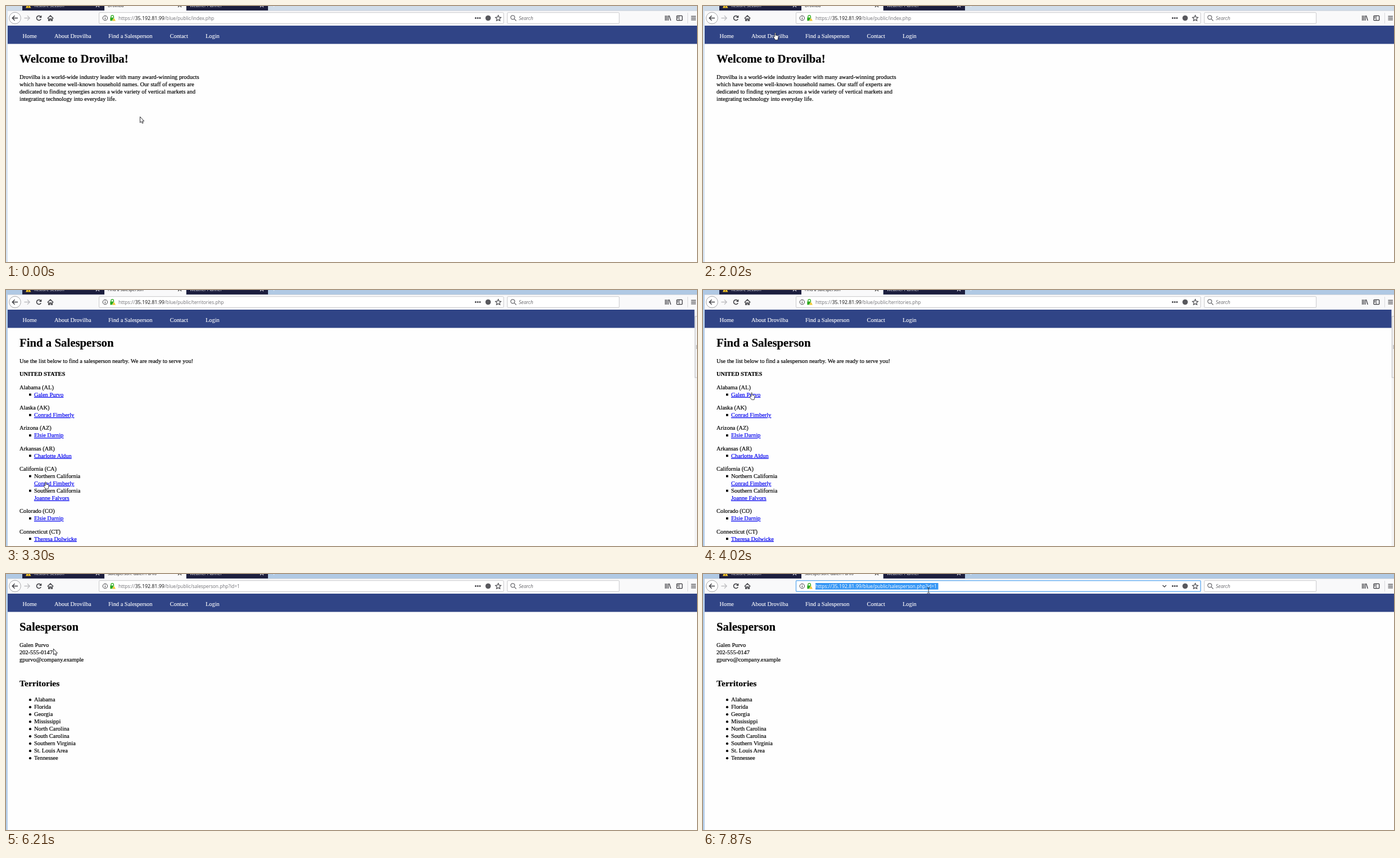
Animation, 1229 px wide and 456 px high, one loop 8 s. Source, as an HTML page:

```html
<!DOCTYPE html>
<html lang="en">
<head>
<meta charset="utf-8">
<title>Browsing session</title>
<style>
  html, body { margin: 0; width: 100%; height: 100%; overflow: hidden; background: #fefefe; }
  svg { display: block; width: 100%; height: 100%; }
  text { font: 10.4px "Liberation Serif", "Times New Roman", serif; white-space: pre; }
  #home text, #list text, #person text { stroke: #000; stroke-width: .2; }
  .h1 { font-size: 20.8px; font-weight: bold; }
  .h2 { font-size: 15.6px; font-weight: bold; }
  .bold { font-weight: bold; }
  .nav { fill: #fff; stroke: #fff; stroke-width: .12; }
  #list .link { fill: #00e; stroke: #00e; text-decoration: underline; }
  .ui { font-family: "Open Sans", "Noto Sans", sans-serif; }
  .tab { font-size: 7.3px; }
  .icon { fill: none; stroke: #3c3c41; stroke-width: 1.3; }
  .field { fill: #fff; stroke: #c8c8ca; }
  #frame { fill: #d6e3f1; }
  #strip { fill: #cfdce9; }
  .active #frame { fill: #b7cfea; }
  .active #strip { fill: #b0c9e4; }
  .hover #urlBox { stroke: #aaaaae; }
  .focus #urlBox { stroke: #6fb3f2; stroke-width: 1.5; }
  #selection, #chevron { visibility: hidden; }
  .focus #selection, .hover #chevron { visibility: visible; }
  .url { fill: #707075; }
  .focus .url { fill: #fff; }
  #host { fill: #0c0c0d; }
  .focus #host { fill: #fff; }
</style>
</head>
<body>
<svg id="stage" viewBox="0 0 1229 456">
  <rect width="1229" height="456" fill="#fefefe"/>
  <rect id="strip" width="1229" height="8"/>
  <rect x="3" y="8" width="1226" height="28" fill="#f9f9fa"/>
  <rect id="frame" y="8" width="3" height="448"/>

  <g id="tabs">
    <path d="M29 0H175V8H29ZM320.500 0H466V8H320.500Z" fill="#1c1e3e"/>
    <path d="M3 8.300H175M320 8.300H1229" stroke="#b4bac4" stroke-width=".6"/>
    <rect x="175" width="145.500" height="9" fill="#f9f9fa"/>
    <rect id="burst" x="175" height="8" fill="#b9dcfb"/>
    <path d="M38.500 -4H40.500L44.500 3.500H35Z" fill="#f5c629"/>
    <path d="M39.700 0V2.500" stroke="#503c00"/>
    <text class="ui tab" x="50" y="2" fill="#f4f4f6">Restore Session</text>
    <text class="ui tab" id="tabTitle" x="181" y="2" fill="#1a1a1c"></text>
    <text class="ui tab" x="327" y="2" fill="#f4f4f6">Weather Planner</text>
    <path d="M160 -4L166 2M166 -4L160 2M452 -4L458 2M458 -4L452 2" stroke="#e8e8ee" stroke-width="1.2"/>
    <path d="M306 -4L312 2M312 -4L306 2" stroke="#333" stroke-width="1.2"/>
    <path d="M476.500 0V1.500" stroke="#f4f7fb"/>
  </g>

  <g class="icon">
    <circle cx="16" cy="21.500" r="10.300" fill="#fff" stroke="#a5a5a8" stroke-width="1"/>
    <path d="M21 21.500H11.500M15.500 17.300L11.300 21.500L15.500 25.700" stroke-width="1.500"/>
    <path d="M32.500 21.500H42M38 17.300L42.200 21.500L38 25.700" stroke="#bdbdc0"/>
    <path d="M61.300 18.600A4 4 0 1 0 62.200 23" stroke-width="1.500"/>
    <path d="M63.300 16.500V21H58.800Z" fill="#3c3c41" stroke="none"/>
    <path d="M73.800 22.200L79 17L84.200 22.200M75.700 22V26H77.700V23H80.300V26H82.300V22" stroke-width="1.500"/>
    <rect id="urlBox" class="field" x="165.500" y="11.700" width="719.500" height="19.600" rx="1.500" stroke-width="1"/>
    <rect class="field" x="891.700" y="11.700" width="199" height="19.600" rx="1.500" stroke-width="1"/>
    <circle cx="176.300" cy="21.500" r="4.200" stroke-width="1"/>
    <path d="M176.300 20.800V24M176.300 18.800V19.800" stroke-width="1.100"/>
    <path d="M186.800 21V19A2.300 2.300 0 0 1 191.400 19V21" stroke="#2caa1e"/>
    <rect x="185.300" y="20.500" width="7" height="5.800" fill="#2caa1e" stroke="none"/>
    <path d="M192 20.800L195.300 26.800H188.700Z" fill="#f2c52d" stroke="#fff" stroke-width=".5"/>
    <path id="chevron" d="M817.500 20L820.700 23.200L823.900 20"/>
    <path d="M834 21.500H836.600M837.800 21.500H840.400M841.600 21.500H844.200" stroke-width="2.500"/>
    <circle cx="857.500" cy="21.500" r="4.800" fill="#58585d" stroke="none"/>
    <path id="star" stroke-width="1.100"/>
    <circle cx="901.300" cy="20.300" r="3.500" stroke="#6a6a6e"/>
    <path d="M903.900 22.900L907.500 26.500" stroke="#6a6a6e"/>
    <path d="M1172.700 17V26M1175.300 17V26M1177.900 17V26M1179.500 17L1182.300 26"/>
    <rect x="1193" y="17.300" width="9.700" height="8.400" rx="1"/>
    <path d="M1197.200 17V26M1194 19.500H1196M1194 21.500H1196" stroke-width="1"/>
    <path d="M1212.500 12V31" stroke="#d8d8da" stroke-width="1"/>
    <path d="M1218.500 18.300H1227M1218.500 21.500H1227M1218.500 24.700H1227"/>
  </g>
  <rect id="selection" x="200" y="16" width="218.500" height="11.700" fill="#3797f5"/>
  <text class="ui url" x="200" y="24.800" style="font-size:8.600px">https://</text>
  <text class="ui url" id="host" x="229.500" y="24.800" style="font-size:8.800px">35.192.81.99</text>
  <text class="ui url" id="path" x="282" y="24.800" style="font-size:8.300px"></text>
  <text class="ui" x="912" y="25" fill="#66666a" style="font-size:8.700px;font-style:italic">Search</text>

  <rect x="3" y="35" width="1226" height="32.500" fill="#304486"/>
  <g id="nav"></g>
  <g id="home"></g>
  <g id="list">
    <rect x="1224.500" y="35" width="4.500" height="421" fill="#f3f3f4"/>
    <rect x="1225.500" y="47" width="6" height="109" fill="#f1f1f2" stroke="#b2b2b6" stroke-width=".8"/>
    <path d="M1227.500 99H1229M1227.500 101.500H1229M1227.500 104H1229" stroke="#66666a"/>
  </g>
  <g id="person"></g>

  <g id="arrow" fill="#fff" stroke="#18181c" stroke-width=".9">
    <path d="M.4 .2V10.800L2.700 8.700L4.300 12L6 11.300L4.500 8H7.600Z"/>
  </g>
  <g id="hand" fill="#fff" stroke="#18181c" stroke-width=".8">
    <path d="M2.700 8V1.300Q3.500 -.2 4.300 1.300V5L8.200 5.900Q9.200 6.300 9 8L8 13.400H3.500L.4 8.600Q.2 7 1.400 7.200Z"/>
  </g>
  <g id="beam" fill="none" stroke="#252528" stroke-width=".9">
    <path d="M0 .5H2L2.500 1L3 .5H5M2.500 1V9.500M0 10H2L2.500 9.500L3 10H5"/>
  </g>
</svg>
<script>
const LOOP = 8000;
const LIST_AT = 2910, PERSON_AT = 4990;
const $ = id => document.getElementById(id);

function add(parent, tag, attrs, content = '') {
  const node = document.createElementNS('http://www.w3.org/2000/svg', tag);
  for (const key in attrs) node.setAttribute(key, attrs[key]);
  node.textContent = content;
  parent.append(node);
}
const write = (page, x, y, content, cls = '') =>
  add($(page), 'text', { x, y, class: cls }, content);
const square = y => add($('list'), 'rect', { x: 41, y: y - 5.2, width: 3.8, height: 3.8 });

[[29.5, 'Home'], [86, 'About Drovilba'], [182, 'Find a Salesperson'], [291.5, 'Contact'], [355, 'Login']]
  .forEach(([x, label]) => write('nav', x, 56.5, label, 'nav'));

write('home', 24, 101, 'Welcome to Drovilba!', 'h1');
[
  'Drovilba is a world-wide industry leader with many award-winning products',
  'which have become well-known household names. Our staff of experts are',
  'dedicated to finding synergies across a wide variety of vertical markets and',
  'integrating technology into everyday life.'
].forEach((line, i) => write('home', 24, 130 + 13 * i, line));

write('list', 24, 101, 'Find a Salesperson', 'h1');
write('list', 24, 130, 'Use the list below to find a salesperson nearby. We are ready to serve you!');
write('list', 24, 153, 'UNITED STATES', 'bold');
let y = 176.7;
for (const [state, ...entries] of [
  ['Alabama (AL)', ['Galen Purvo']],
  ['Alaska (AK)', ['Conrad Fimberly']],
  ['Arizona (AZ)', ['Elsie Darnip']],
  ['Arkansas (AR)', ['Charlotte Aldun']],
  ['California (CA)', ['Conrad Fimberly', 'Northern California'], ['Joanne Falvors', 'Southern California']],
  ['Colorado (CO)', ['Elsie Darnip']],
  ['Connecticut (CT)', ['Theresa Dolwicke']]
]) {
  write('list', 24, y, state);
  for (const [name, region] of entries) {
    square(y += 13);
    if (region) {
      write('list', 50, y, region);
      y += 13;
    }
    write('list', 50, y, name, 'link');
  }
  y += 23.3;
}

write('person', 24, 101, 'Salesperson', 'h1');
['Galen Purvo', '202-555-0147', 'gpurvo@company.example']
  .forEach((line, i) => write('person', 24, 130 + 13 * i, line));
write('person', 24, 200, 'Territories', 'h2');
['Alabama', 'Florida', 'Georgia', 'Mississippi', 'North Carolina', 'South Carolina',
  'Southern Virginia', 'St. Louis Area', 'Tennessee'].forEach((place, i) => {
  const base = 227.3 + 13 * i;
  add($('person'), 'circle', { cx: 43, cy: base - 3.1, r: 2.1 });
  write('person', 50, base, place);
});

$('star').setAttribute('d', 'M' + Array.from({ length: 10 }, (_, i) => {
  const r = i % 2 ? 2.5 : 5.3, a = i * Math.PI / 5;
  return (875.5 + r * Math.sin(a)).toFixed(1) + ' ' + (21.9 - r * Math.cos(a)).toFixed(1);
}).join('L') + 'Z');

const PAGES = {
  home: ['Drovilba', 'index'],
  list: ['Find a Salesperson', 'territories'],
  person: ['Salesperson: Galen Purvo', 'salesperson']
};

// Pointer stops: time, x, y, shape
const STOPS = [
  [0, 238, 197, 'arrow'], [710, 244, 193, 'arrow'], [1060, 311, 150, 'arrow'],
  [1620, 141, 71, 'arrow'], [1770, 130, 51, 'hand'], [2020, 125, 47, 'hand'],
  [2160, 138, 48, 'hand'], [2520, 203, 53, 'hand'], [2760, 205, 53, 'hand'],
  [2910, 200, 70, 'arrow'], [3040, 140, 190, 'arrow'], [3300, 67, 341, 'hand'],
  [3420, 68, 320, 'arrow'], [3870, 78, 190, 'hand'], [4020, 83, 182, 'hand'],
  [4990, 90, 188, 'arrow'], [5130, 113, 203, 'arrow'], [5290, 108, 190, 'arrow'],
  [5680, 23, 132, 'arrow'], [5940, 59, 133, 'arrow'], [6210, 84, 133, 'arrow'],
  [6370, 90, 130, 'arrow'], [6920, 360, 25, 'beam'], [7050, 399, 23, 'beam'],
  [7870, 398.6, 24, 'beam']
];
const STEP = 130;

function pointerAt(t) {
  const i = STOPS.findLastIndex(stop => stop[0] <= t);
  const [t0, x0, y0, shape] = STOPS[i];
  const [t1, x1, y1] = STOPS[i + 1] || [LOOP, x0, y0];
  const resting = t1 - t0 > 700;
  const u = resting ? 0 : Math.floor((t - t0) / STEP) * STEP / (t1 - t0);
  return { x: x0 + (x1 - x0) * u, y: y0 + (y1 - y0) * u, shape };
}

function draw(t) {
  const page = t < LIST_AT ? 'home' : t < PERSON_AT ? 'list' : 'person';
  for (const id in PAGES) $(id).style.display = id === page ? '' : 'none';
  const [title, file] = PAGES[page];
  $('tabTitle').textContent = title;
  $('path').textContent = `/blue/public/${file}.php${page === 'person' ? '?id=1' : ''}`;

  const age = t - (page === 'person' ? PERSON_AT : LIST_AT);
  const bursting = age >= 130 && age < 390;
  $('burst').setAttribute('width', !bursting ? 0 : age < 300 ? 60 : 145);
  $('burst').setAttribute('opacity', age < 300 ? 1 : .4);

  const { classList } = $('stage');
  classList.toggle('active', t >= 2520);
  classList.toggle('hover', t >= 6920);
  classList.toggle('focus', t >= 7340);

  const pointer = pointerAt(t);
  for (const id of ['arrow', 'hand', 'beam']) $(id).style.display = id === pointer.shape ? '' : 'none';
  $(pointer.shape).setAttribute('transform', `translate(${pointer.x} ${pointer.y})`);
}

const start = performance.now();
(function tick() {
  draw((performance.now() - start) % LOOP);
  requestAnimationFrame(tick);
})();
</script>
</body>
</html>
```
